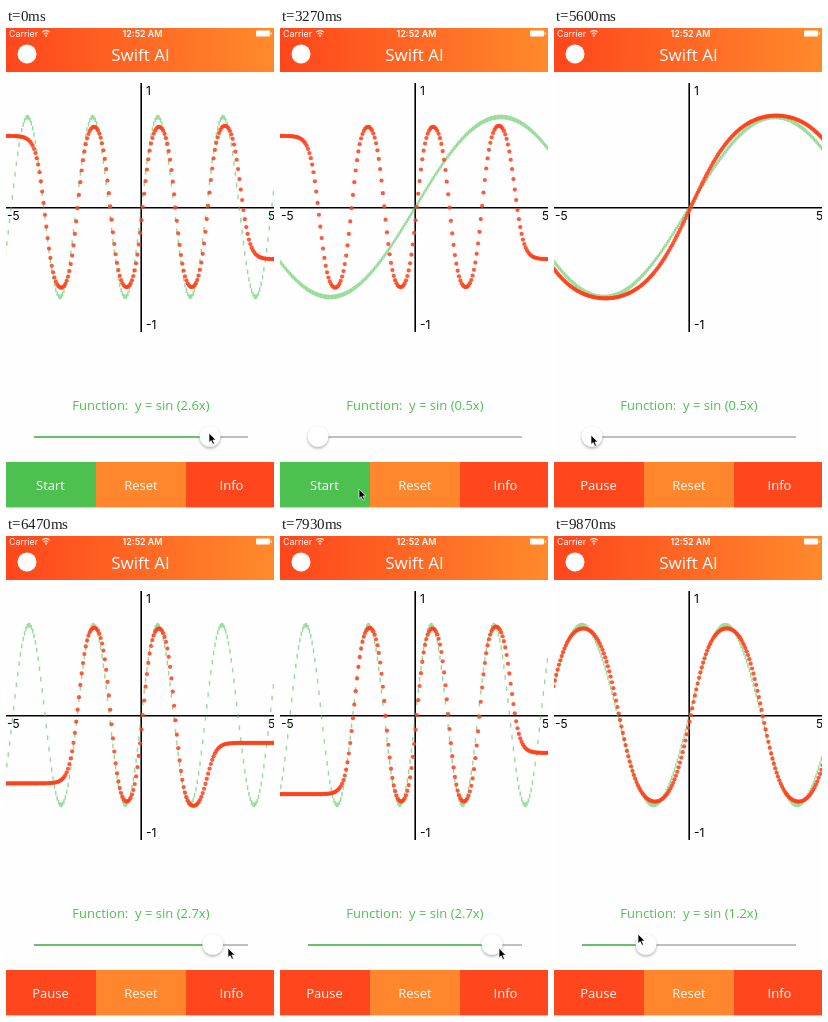
Write an HTML page with a canvas that moves like this. It is 268x480 px and loops after 9.94 s.

```html
<!DOCTYPE html>
<html lang="en">
<head>
<meta charset="utf-8">
<title>Swift AI</title>
<style>
  html, body { margin: 0; width: 100%; height: 100%; overflow: hidden; background: #fefefe; }
  svg, canvas { position: absolute; left: 0; top: 0; }
  text { font: 13px "Open Sans", sans-serif; fill: #fff; white-space: pre; }
  .mid { text-anchor: middle; }
  .axis text { font: 12px Inter, sans-serif; fill: #000; }
  .status text { font: 8.9px Inter, sans-serif; }
</style>
</head>
<body>
<svg width="268" height="480">
  <defs>
    <linearGradient id="bar">
      <stop offset="0" stop-color="#ff461c"/>
      <stop offset="1" stop-color="#ff8a2c"/>
    </linearGradient>
    <filter id="shadow" x="-50%" y="-50%" width="200%" height="200%">
      <feDropShadow dx="0" dy="1.5" stdDeviation="1.5" flood-opacity=".35"/>
    </filter>
  </defs>

  <rect width="268" height="44" fill="url(#bar)"/>
  <g class="status">
    <text x="3" y="8.5">Carrier</text>
    <text x="136.5" y="8.5" class="mid" style="font-weight:600">12:52 AM</text>
    <path d="M36.3 4.2a5.2 5.2 0 0 1 7.4 0M37.9 6a3 3 0 0 1 4.2 0" fill="none" stroke="#fff" stroke-width="1.1"/>
    <circle cx="40" cy="7.7" r="1" fill="#fff"/>
    <rect x="250" y="2.5" width="14" height="6" rx="1" fill="#fff"/>
    <rect x="264.7" y="4.3" width="1" height="2.4" fill="#fff"/>
  </g>
  <circle cx="21" cy="26" r="9.5" fill="#fff"/>
  <text x="134.5" y="32.5" class="mid" style="font-size:17px">Swift AI</text>

  <g class="axis">
    <path d="M135.2 55V304M0 179.8H268" stroke="#000" stroke-width="1.6"/>
    <text x="140" y="67">1</text>
    <text x="140" y="301">-1</text>
    <text x="1" y="192">-5</text>
    <text x="262" y="192">5</text>
  </g>

  <text id="label" x="66.3" y="382" style="fill:#4cc150"></text>
  <path d="M28 409H242" stroke="#aaa" stroke-width="1.5"/>
  <path id="filled" stroke="#4cc150" stroke-width="1.5"/>
  <circle id="knob" cy="408.5" r="10.3" fill="#fff" filter="url(#shadow)"/>

  <rect id="run" y="434" width="90" height="45.4"/>
  <rect x="90" y="434" width="90" height="45.4" fill="#ff862c"/>
  <rect x="180" y="434" width="88" height="45.4" fill="#ff461c"/>
  <text id="runText" x="44.5" y="461.5" class="mid"></text>
  <text x="135" y="461.5" class="mid">Reset</text>
  <text x="225.5" y="461.5" class="mid">Info</text>
  <path id="cursor" d="M0 0V9.6L2.2 7.6 3.8 11.2 5.5 10.5 3.9 7H6.9Z" stroke="#fff" stroke-width=".7"/>
</svg>
<canvas width="268" height="480"></canvas>
<script>
const LOOP = 9940, STEP = 1000 / 15, START = 3500;
const UNIT = 27.2, ORIGIN = 135.5, MIDDLE = 179, AMPLITUDE = 90;
const ctx = document.querySelector('canvas').getContext('2d');
const el = id => document.getElementById(id);
const mix = (a, b, u) => a + (b - a) * u;
const smooth = u => u * u * (3 - 2 * u);
const sigmoid = x => 1 / (1 + Math.exp(-x));

// What the network has learned: first and last zero crossing it follows,
// flat levels outside them, and the swing in between
const fits = [
  { time: START, first: -3, last: 3, left: 0.79, right: -0.58, swing: 1 },
  { time: 5600, first: -1, last: 1, left: 1.14, right: -1.14, swing: 1.14 },
  { time: 6470, first: -2, last: 2, left: -0.76, right: -0.31, swing: 1.08 },
  { time: 7930, first: -2, last: 3, left: -0.88, right: -0.42, swing: 1.08 },
  { time: 8800, first: -2, last: 3, left: -0.85, right: -0.54, swing: 1.08 },
  { time: 9870, first: -2, last: 2, left: -1.08, right: 1.08, swing: 1.08 }
];

const knobKeys = [[0, 204], [400, 204], [1800, 38], [5750, 38], [6550, 212], [8700, 212], [9550, 92]];
const cursorKeys = [
  [0, 203, 405], [350, 203, 405], [1700, 37, 407], [2100, 37, 407], [2800, 79, 461], [3900, 79, 461],
  [4900, 37, 407], [5700, 37, 407], [6400, 222, 412], [7600, 219, 412], [8600, 219, 413], [9400, 84, 398]
];

function track(keys, t) {
  const i = keys.findIndex(key => key[0] > t);
  if (i < 0) return keys[keys.length - 1].slice(1);
  const a = keys[i - 1], b = keys[i], u = smooth((t - a[0]) / (b[0] - a[0]));
  return a.slice(1).map((v, k) => mix(v, b[k + 1], u));
}

const frequency = t => 0.5 + (track(knobKeys, t)[0] - 38) / 78.2;

// A sum of sigmoid steps, one at each zero crossing of the sine
function output(fit, v, t) {
  const f = frequency(fit === fits[0] ? 0 : t);
  const phase = f * (v - 0.05) / Math.PI;
  let level = fit.left, sum = level;
  for (let n = fit.first; n <= fit.last; n++) {
    const next = n === fit.last ? fit.right : n % 2 ? -fit.swing : fit.swing;
    sum += (next - level) * sigmoid((phase - n) / 0.14);
    level = next;
  }
  return sum;
}

function networkAt(t) {
  const i = Math.max(0, fits.findLastIndex(fit => fit.time <= t));
  const a = fits[i], b = fits[i + 1] || a;
  const progress = a === b ? 0 : Math.max(0, (t - a.time) / (b.time - a.time));
  const u = 1 - (1 - progress) ** 3;
  return v => mix(output(a, v, t), output(b, v, t), u);
}

function plot(color, fn, mark) {
  ctx.fillStyle = color;
  for (let i = -100; i <= 100; i++) {
    const v = i / 20;
    mark(ORIGIN + v * UNIT, MIDDLE - AMPLITUDE * fn(v));
  }
}

function draw(t) {
  const f = frequency(t), knob = track(knobKeys, t)[0], running = t >= START;
  ctx.clearRect(0, 0, 268, 480);
  plot('rgba(76, 193, 80, .58)', v => Math.sin(f * v), (x, y) => ctx.fillRect(x - 0.7, y - 2.3, 1.4, 4.6));
  plot('rgba(255, 66, 26, .87)', networkAt(t), (x, y) => {
    ctx.beginPath();
    ctx.arc(x, y, 2.1, 0, 7);
    ctx.fill();
  });
  el('label').textContent = `Function:  y = sin (${f.toFixed(1)}x)`;
  el('filled').setAttribute('d', `M28 409H${knob}`);
  el('knob').setAttribute('cx', knob);
  el('run').setAttribute('fill', running ? '#ff461c' : '#4cc150');
  el('runText').textContent = running ? 'Pause' : 'Start';
  el('cursor').setAttribute('transform', `translate(${track(cursorKeys, t)})`);
}

function tick() {
  const t = performance.now() % LOOP;
  draw(Math.floor((t + 5) / STEP) * STEP);
  requestAnimationFrame(tick);
}
tick();
</script>
</body>
</html>
```
